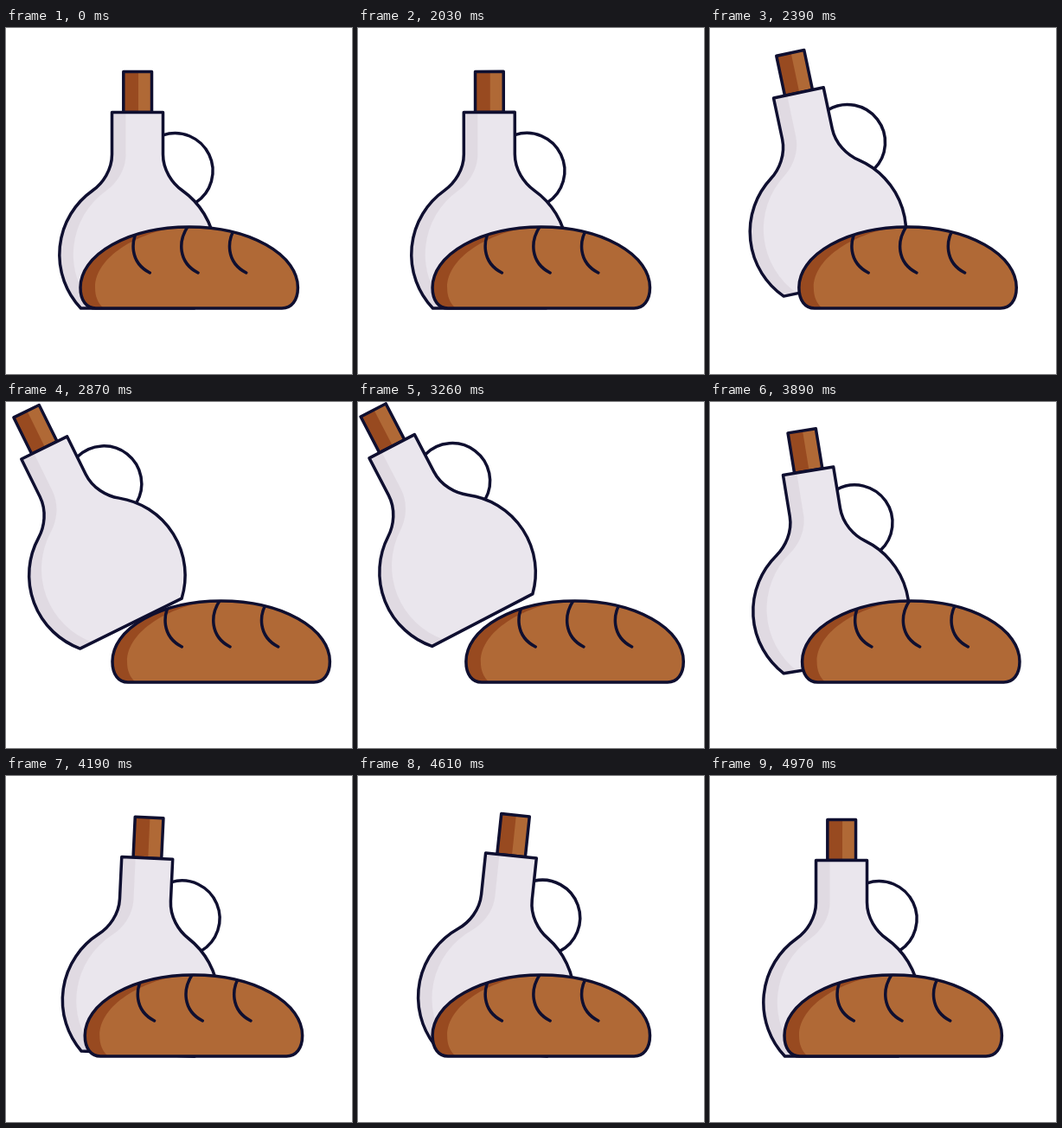
An HTML page for the animation above (5 s loop, 400 by 400 pixels).

```html
<!DOCTYPE html>
<html lang="en">
<head>
<meta charset="utf-8">
<title>Bottle and bread</title>
<style>
  html, body { margin: 0; width: 100%; height: 100%; overflow: hidden; background: #fff; }
  svg { display: block; width: 100vw; height: 100vh; }
  .line { fill: none; stroke: #0f0f30; stroke-width: 3.5; stroke-linecap: round; stroke-linejoin: round; }
</style>
</head>
<body>
<svg viewBox="0 0 400 400">
  <defs>
    <path id="glass" d="M122.5 97.5H181.5V146C181.5 164 192 179.5 204 188A90.5 90.5 0 0 1 217.5 324H86.5A90.5 90.5 0 0 1 100 188C112 179.5 122.5 164 122.5 146Z"/>
    <path id="loaf" d="M104 324C93 324 86 315 86 300A125.7 70 0 0 1 337.4 300C337.4 315 330 324 319 324Z"/>
    <path id="slash" class="line" d="M210.5 229C198.8 246 198.8 271 222 283"/>
    <clipPath id="inGlass"><use href="#glass"/></clipPath>
    <clipPath id="inLoaf"><use href="#loaf"/></clipPath>
  </defs>

  <g id="bottle">
    <path class="line" d="M181.5 123.8A43.7 43.7 0 0 1 219 202"/>
    <path fill="#b06936" d="M135.8 50.5H168.5V97.5H135.8Z"/>
    <path fill="#984a20" d="M135.8 50.5H153V97.5H135.8Z"/>
    <path class="line" d="M135.8 50.5H168.5V97.5H135.8Z"/>
    <use href="#glass" fill="#e0dae2"/>
    <g clip-path="url(#inGlass)"><use href="#glass" x="16" fill="#eae6ed"/></g>
    <use href="#glass" class="line"/>
  </g>

  <g id="bread">
    <use href="#loaf" fill="#984a20"/>
    <g clip-path="url(#inLoaf)">
      <path fill="#b06936" d="M113 324C106 318 103 310 103 300C103 262 160 232 211 229H340V325H113Z"/>
      <use href="#slash" x="-55.7"/>
      <use href="#slash"/>
      <use href="#slash" x="55.7"/>
    </g>
    <use href="#loaf" class="line"/>
  </g>
</svg>
<script>
  const LOOP = 5000;
  const LEAN = 27.8, ROCK = 6, SLIDE = 39.2;

  const bezier = (a, b, s) => 3 * a * s * (1 - s) ** 2 + 3 * b * s * s * (1 - s) + s ** 3;

  // Progress from 0 to 1 between two times, eased as cubic-bezier(x1, 0, x2, 1)
  function ramp(t, from, to, x1, x2) {
    const x = Math.min(1, Math.max(0, (t - from) / (to - from)));
    let low = 0, high = 1;
    for (let i = 0; i < 24; i++) {
      const mid = (low + high) / 2;
      if (bezier(x1, x2, mid) < x) low = mid; else high = mid;
    }
    return bezier(0, 1, high);
  }

  const bottle = document.getElementById('bottle');
  const bread = document.getElementById('bread');

  function draw() {
    const t = performance.now() % LOOP;
    const out = ramp(t, 2010, 3110, 0.25, 0.45);
    const swing = ramp(t, 3110, 4620, 0.65, 0.35);
    const settle = ramp(t, 4620, 4985, 0.4, 0.36);
    const back = ramp(t, 3110, 4700, 0.65, 0.35);

    // Leaning left lifts the bottle; leaning right rocks it on its lower right corner
    const angle = -LEAN * out + (LEAN + ROCK) * swing - ROCK * settle;
    const rise = angle < 0 ? 2.05 * angle : -angle;
    bottle.setAttribute('transform',
      `translate(${2.6 * angle} ${rise}) rotate(${angle} 152 187)`);
    bread.setAttribute('transform', `translate(${SLIDE * (out - back)} 0)`);
    requestAnimationFrame(draw);
  }
  draw();
</script>
</body>
</html>
```
